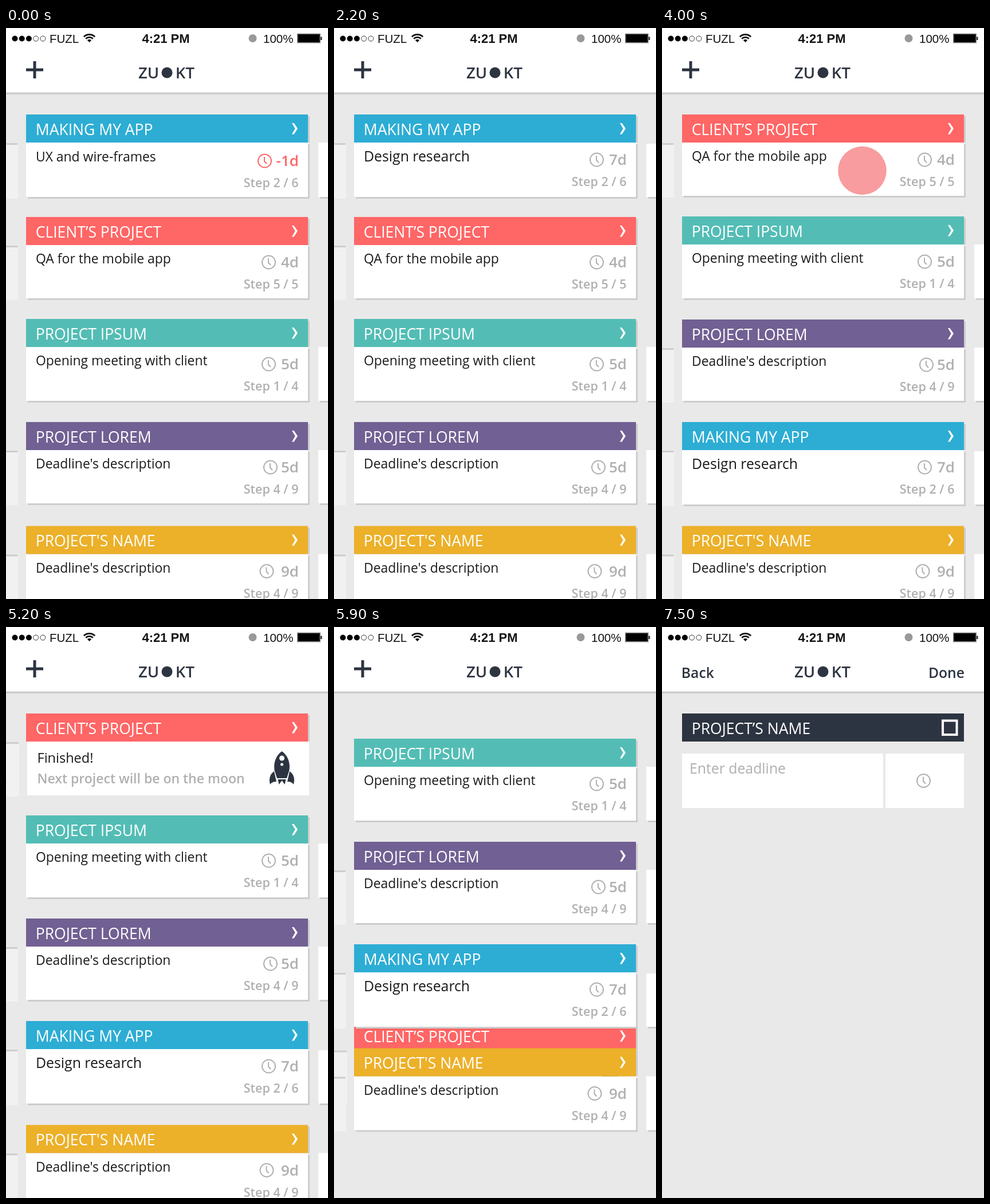
Animation, 562 px wide and 997 px high, one loop 8 s. Source, as an HTML page with a canvas:

```html
<!DOCTYPE html>
<html lang="en">
<head>
<meta charset="utf-8">
<title>Project deadlines</title>
<style>
html, body { margin: 0; width: 100%; height: 100%; overflow: hidden; background: #e9e9e9; }
canvas { display: block; }
</style>
</head>
<body>
<canvas id="stage" width="562" height="997"></canvas>
<script>
const g = document.getElementById('stage').getContext('2d');
const SANS = '"Open Sans", sans-serif';
const UI = '"Liberation Sans", Arial, sans-serif';
const DARK = '#2d3441', GREY = '#b0b0b0', SHADE = '#cdcdcd', INK = '#1a1a1a', RED = '#ff6666';
const LOOP = 8000;

const blank = { top: 49 };
const task = (label, days, clockX, step, more) =>
  ({ label, days, clockX, step, top: 49, size: 22.9, base: 81, drop: 0, color: GREY, ...more });

// prev: a completed step peeks in from the left
const making = {
  title: 'MAKING MY APP', color: '#2dadd4', h: 144, prev: true, dx: 0,
  steps: [
    task('UX and wire-frames', '-1d', 451.5, '2 / 6', { base: 82, drop: 2, color: RED }),
    task('Design research', '7d', 458.5, '2 / 6', { base: 82, size: 24.8 }),
    { top: 51 }
  ]
};
const client = {
  title: 'CLIENT’S PROJECT', color: RED, h: 142, prev: true, dx: 2,
  steps: [task('QA for the mobile app', '4d', 458.5, '5 / 5'), { finale: true }]
};
const ipsum = {
  title: 'PROJECT IPSUM', color: '#53bdb5', h: 143, dx: 0,
  steps: [task('Opening meeting with client', '5d', 458.5, '1 / 4'), blank]
};
const lorem = {
  title: 'PROJECT LOREM', color: '#716093', h: 142, prev: true, dx: 0,
  steps: [task("Deadline's description", '5d', 461.5, '4 / 9'), blank]
};
const named = {
  title: "PROJECT'S NAME", color: '#ecb029', h: 143, prev: true, dx: 0,
  steps: [task("Deadline's description", '9d', 455, '4 / 9'), blank]
};

function rect(x, y, w, h, color) {
  g.fillStyle = color;
  g.fillRect(x, y, w, h);
}

function text(str, x, y, size, color, weight = 400, align = 'left', family = SANS) {
  g.font = `${weight} ${size}px ${family}`;
  g.textAlign = align;
  g.fillStyle = color;
  g.fillText(str, x, y);
}

function disc(x, y, r, color) {
  g.beginPath();
  g.arc(x, y, r, 0, 2 * Math.PI);
  g.fillStyle = color;
  g.fill();
}

function line(points, width, color) {
  g.beginPath();
  points.forEach(([x, y]) => g.lineTo(x, y));
  g.lineWidth = width;
  g.strokeStyle = color;
  g.stroke();
}

function arc(x, y, r, from, to, width, color) {
  g.beginPath();
  g.arc(x, y, r, from, to);
  g.lineWidth = width;
  g.strokeStyle = color;
  g.stroke();
}

function clock(x, y, color) {
  arc(x, y, 11.5, 0, 2 * Math.PI, 2, color);
  line([[x - .5, y - 7], [x - .5, y + .5], [x + 3.5, y + 5]], 2, color);
}

const chevron = new Path2D('M499 15H502.500L509 24.500L502.500 34.500H499L504.700 24.500Z');
const hull = new Path2D('M0 0C10 7 15 19 13 33L8.500 47H-8.500L-13 33C-15 19-10 7 0 0Z');
const fin = new Path2D('M-13.500 35C-21 40-23 48-20.500 58C-18 54-14 53-9.500 53Z');
const flame = new Path2D('M-7 49H7L5 58L0 51L-5 58Z');

function rocket(x, y) {
  g.save();
  g.translate(x, y);
  g.fillStyle = DARK;
  [hull, flame, fin].forEach(p => g.fill(p));
  g.scale(-1, 1);
  g.fill(fin);
  disc(0, 12, 4.5, '#fff');
  disc(0, 23, 2.5, '#fff');
  g.restore();
}

function body(s, h, pressed) {
  if (s.finale) {
    rect(35, 49, 492, 94, '#fff');
    text('Finished!', 52.5, 86, 23.5, INK);
    text('Next project will be on the moon', 52.5, 122, 23, GREY, 600);
    rocket(479.5, 66);
    return;
  }
  if (pressed) {
    rect(35, 50, 494, h - 47, SHADE);
    rect(38, 53, 492, h - 50, '#f1f1f1');
    g.translate(-2, 0);
  } else {
    rect(38, s.top + 3, 492, h - s.top, SHADE);
    rect(35, s.top, 492, h - s.top, '#fff');
  }
  if (!s.label) return;
  text(s.label, 52, s.base, s.size, INK);
  clock(s.clockX, 79 + s.drop, s.color);
  text(s.days, 511, 88 + s.drop, 26, s.color, 600, 'right');
  text('Step ' + s.step, 510.5, 125 + s.drop, 21.5, GREY, 600, 'right');
}

function header(title, color) {
  rect(35, 0, 492, 49, color);
  text(title, 51.7, 35.5, 26.5, '#fff');
}

function card(c, y, slide = 0, pressed = false) {
  g.save();
  g.translate(0, Math.round(y * 2) / 2);
  const place = (s, i, down) => {
    g.save();
    g.translate(Math.ceil((i - slide) * 509.6) + (pressed ? c.dx : 0), 0);
    body(s, c.h, down);
    g.restore();
  };
  if (c.prev) place(blank, -1, true);
  c.steps.forEach((s, i) => {
    if (!s.finale || pressed) place(s, i, i === 0 && pressed);
  });
  rect(38, 3, 492, 46, SHADE);
  header(c.title, c.color);
  g.fill(chevron);
  g.restore();
}

function topBar() {
  rect(0, 0, 562, 113, '#fff');
  rect(0, 112.5, 562, 3.5, SHADE);
  for (let i = 0; i < 5; i++) {
    if (i < 3) disc(15.5 + 12.2 * i, 18.5, 5, '#000');
    else arc(15.5 + 12.2 * i, 18.5, 4.5, 0, 2 * Math.PI, 1, '#333');
  }
  text('FUZL', 76, 25.5, 20.5, '#111', 400, 'left', UI);
  const a = -Math.PI * .75, b = -Math.PI * .25;
  arc(145.5, 25, 13.7, a, b, 2.8, '#111');
  arc(145.5, 25, 8.8, a, b, 2.8, '#111');
  arc(145.5, 25, 2.6, a, b, 5.2, '#111');
  text('4:21 PM', 279, 26, 22, '#111', 700, 'center', UI);
  disc(430.5, 18, 7, '#999');
  text('100%', 449, 25.5, 20.5, '#111', 400, 'left', UI);
  rect(508, 9.5, 41, 17, '#888');
  rect(509.5, 11, 38, 14, '#000');
  rect(549, 15.5, 2.5, 5.5, '#333');

  text('ZU', 231, 88, 27.5, DARK, 600);
  disc(281, 78, 9.5, DARK);
  text('KT', 329, 88, 27.5, DARK, 600, 'right');
}

function listScreen(t) {
  const slideA = ramp(t, 1700, 6), slideB = ramp(t, 4700, 6);
  const moveA = ramp(t, 2700, 4), moveB = ramp(t, 5700, 4);
  const up = 179 * (moveA + moveB);
  const drawMaking = () => card(making, 151 + 537 * moveA - 179 * moveB, slideA, t >= 1200);
  const drawClient = () => card(client, 330 - 179 * moveA + 718 * moveB, slideB, t >= 4200);

  // the card on its way down passes behind the others
  const pair = [drawMaking, drawClient];
  if (moveB > 0) pair.reverse();
  pair.forEach(draw => draw());
  card(ipsum, 508 - up);
  card(lorem, 688 - up);
  card(named, 869.5 - 179 * moveB);

  topBar();
  rect(35, 70.5, 30, 5, DARK);
  rect(47.5, 58, 5, 30, DARK);

  const touch = 'rgba(245,114,119,.7)';
  if (t >= 1000 && t < 1200 || t >= 4000 && t < 4200) disc(349.5, 249, 42.3, touch);
  if (t >= 7000) disc(52.5, 71, 42.3, touch);
}

function newScreen() {
  topBar();
  text('Back', 33.8, 88.5, 24.7, DARK, 600);
  text('Done', 528, 88.5, 24.7, DARK, 600, 'right');
  g.save();
  g.translate(0, 151);
  header('PROJECT’S NAME', DARK);
  g.restore();
  g.lineWidth = 4;
  g.strokeStyle = '#fff';
  g.strokeRect(490, 163.5, 24.5, 24.5);
  rect(35, 221, 351, 95, '#fff');
  rect(390, 221, 137, 95, '#fff');
  text('Enter deadline', 48, 256, 24.8, GREY);
  clock(456.5, 268.5, GREY);
}

// linear move in n jumps, one each 100 ms
function ramp(t, start, n) {
  return Math.min(n, Math.max(0, Math.floor((t - start) / 100) + 1)) / n;
}

function frame() {
  const t = performance.now() % LOOP;
  rect(0, 0, 562, 997, '#e9e9e9');
  if (t < 7500) listScreen(t);
  else newScreen();
  requestAnimationFrame(frame);
}
frame();
</script>
</body>
</html>
```
